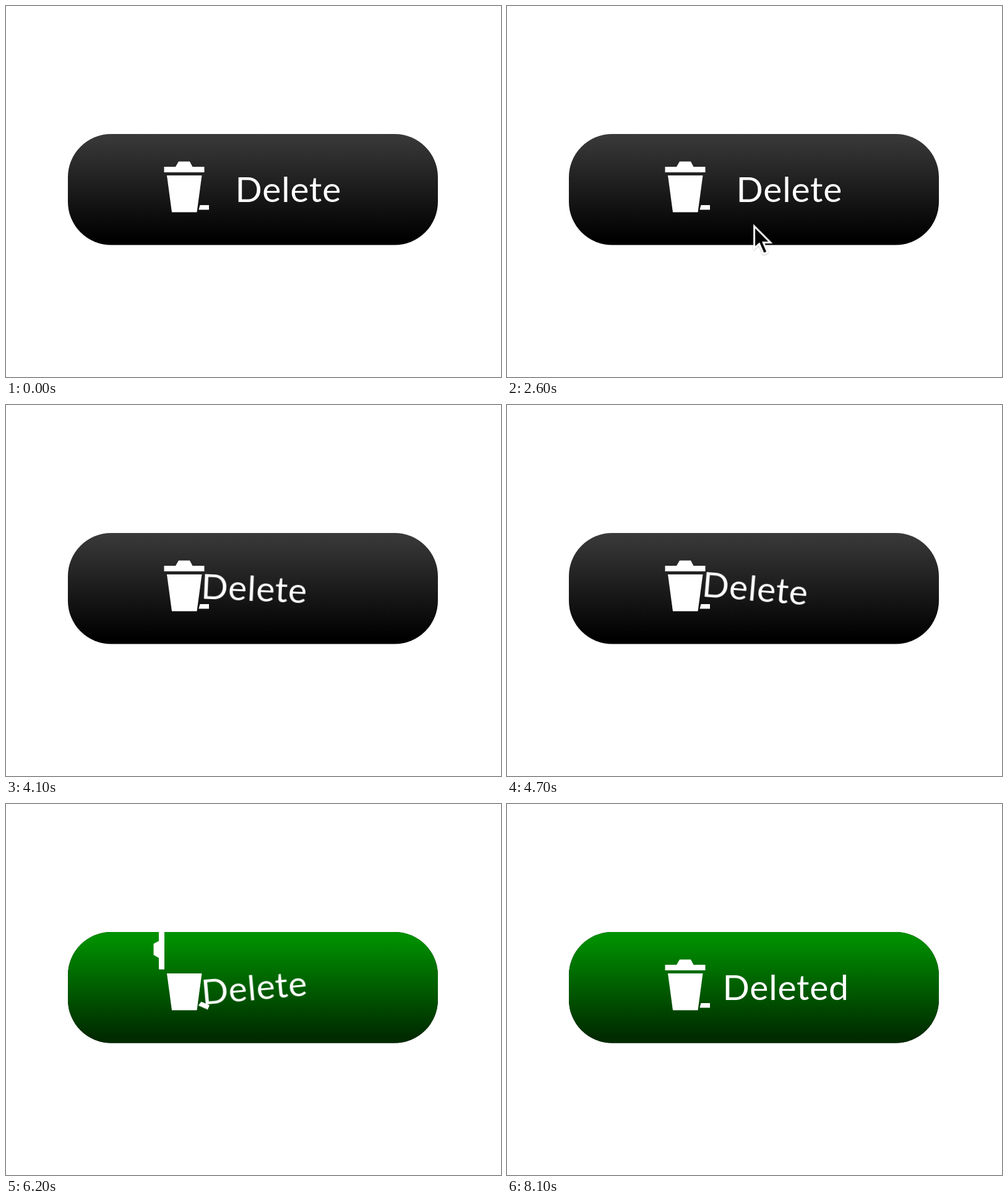
These frames come from a looping animation (800 px wide and 600 px high, 8.5 s). An HTML page:

```html
<!DOCTYPE html>
<html lang="en">
<head>
<meta charset="utf-8">
<title>Delete button</title>
<style>
  html, body { margin: 0; width: 100%; height: 100%; overflow: hidden; background: #fff; }
  svg { display: block; width: 800px; height: 600px; }

  svg * { animation: 8500ms linear infinite; }

  .label { font: 400 57px Lato, "Open Sans", sans-serif; letter-spacing: .8px; fill: #fff; }
  .icon { fill: #fff; }

  .done { opacity: 0; animation-name: done; animation-timing-function: step-end; }
  .slide { animation-name: slide; }
  .tilt { transform-origin: 458px 297px; animation-name: tilt; }
  .last { fill-opacity: 0; animation-name: last; }
  .lid { transform-origin: 255px 268px; animation-name: lid; }
  .pedal { transform-origin: 320px 326px; animation-name: pedal; }
  .sheet { transform: translateY(-80px); animation-name: sheet; }
  .cursor-y { animation-name: cursor-y; }
  .cursor-x { animation-name: cursor-x; }

  @keyframes done {
    0% { opacity: 0; }
    72.941%, 100% { opacity: 1; }
  }

  /* to the bin, then back out to make room for the last letter */
  @keyframes slide {
    0%, 41.176% { transform: translateX(0); animation-timing-function: cubic-bezier(.37, 0, .63, 1); }
    45.882%, 78.824% { transform: translateX(-55px); animation-timing-function: cubic-bezier(.37, 0, .63, 1); }
    85.882%, 100% { transform: translateX(-22px); }
  }

  /* lift, stomp on the pedal, release */
  @keyframes tilt {
    0%, 47.059% { transform: rotate(0); animation-timing-function: cubic-bezier(.37, 0, .63, 1); }
    50.588% { transform: rotate(10deg); animation-timing-function: cubic-bezier(.37, 0, .63, 1); }
    62.353%, 72.941% { transform: rotate(-5deg); animation-timing-function: cubic-bezier(.37, 0, .63, 1); }
    77.647%, 100% { transform: rotate(0); }
  }

  @keyframes last {
    0%, 78.235% { fill-opacity: 0; animation-timing-function: cubic-bezier(.37, 0, .63, 1); }
    85.882%, 100% { fill-opacity: 1; }
  }

  @keyframes lid {
    0%, 57.647% { transform: rotate(0); animation-timing-function: cubic-bezier(.37, 0, .63, 1); }
    62.353%, 72.941% { transform: rotate(-90deg); animation-timing-function: cubic-bezier(.37, 0, .63, 1); }
    77.647%, 100% { transform: rotate(0); }
  }

  @keyframes pedal {
    0%, 57.647% { transform: rotate(0); animation-timing-function: cubic-bezier(.37, 0, .63, 1); }
    62.353%, 72.941% { transform: rotate(24deg); animation-timing-function: cubic-bezier(.37, 0, .63, 1); }
    77.647%, 100% { transform: rotate(0); }
  }

  @keyframes sheet {
    0%, 66.471% { transform: translateY(-70px); }
    70.588%, 100% { transform: translateY(70px); }
  }

  @keyframes cursor-y {
    0%, 23.528% { transform: translateY(640px); opacity: 1; }
    23.529% { transform: translateY(590px); animation-timing-function: cubic-bezier(.3, .3, .5, 1); }
    34.118%, 40% { transform: translateY(320px); }
    41.176% { transform: translateY(318px); opacity: 1; animation-timing-function: cubic-bezier(.37, 0, .63, 1); }
    45.882% { transform: translateY(400px); opacity: 0; }
    100% { transform: translateY(640px); opacity: 0; }
  }

  @keyframes cursor-x {
    0%, 23.529% { transform: translateX(440px); animation-timing-function: cubic-bezier(.37, 0, .63, 1); }
    31.765% { transform: translateX(396px); animation-timing-function: cubic-bezier(.37, 0, .63, 1); }
    34.118%, 40% { transform: translateX(413px); }
    41.176%, 100% { transform: translateX(415px); }
  }
</style>
</head>
<body>
<svg viewBox="0 0 800 600">
  <defs>
    <linearGradient id="dark" x2="0" y2="1">
      <stop stop-color="#3a3a3a"/>
      <stop offset=".95" stop-color="#000"/>
    </linearGradient>
    <linearGradient id="green" x2="0" y2="1">
      <stop offset=".05" stop-color="#009000"/>
      <stop offset=".95" stop-color="#002a00"/>
    </linearGradient>
    <clipPath id="above"><rect x="250" y="150" width="80" height="125"/></clipPath>
  </defs>

  <rect x="100" y="207" width="598" height="179.5" rx="70" fill="url(#dark)"/>
  <rect class="done" x="100" y="207" width="598" height="179.5" rx="70" fill="url(#green)"/>

  <g class="icon">
    <g clip-path="url(#above)"><rect class="sheet" x="263" y="207" width="51" height="66"/></g>
    <path class="lid" d="M255.5 260H274L279 251.5H297L301.500 260H320.500V269H255.500Z"/>
    <path d="M260 274H316.500L308.500 333.500H268Z"/>
    <path class="pedal" d="M313.500 322H328V329.500H311.500Z"/>
  </g>

  <g class="slide">
    <text class="label tilt" x="370.500" y="317">Delete<tspan class="last">d</tspan></text>
  </g>

  <g class="cursor-y">
    <path class="cursor-x" d="M1.500 3.800V39.500L9.500 32.500L16.500 48.500L23 46L16.200 30.300H27.800Z"
      stroke="#fff" stroke-width="3" style="filter: drop-shadow(0 1px 1px rgba(0, 0, 0, .25))"/>
  </g>
</svg>
</body>
</html>
```
